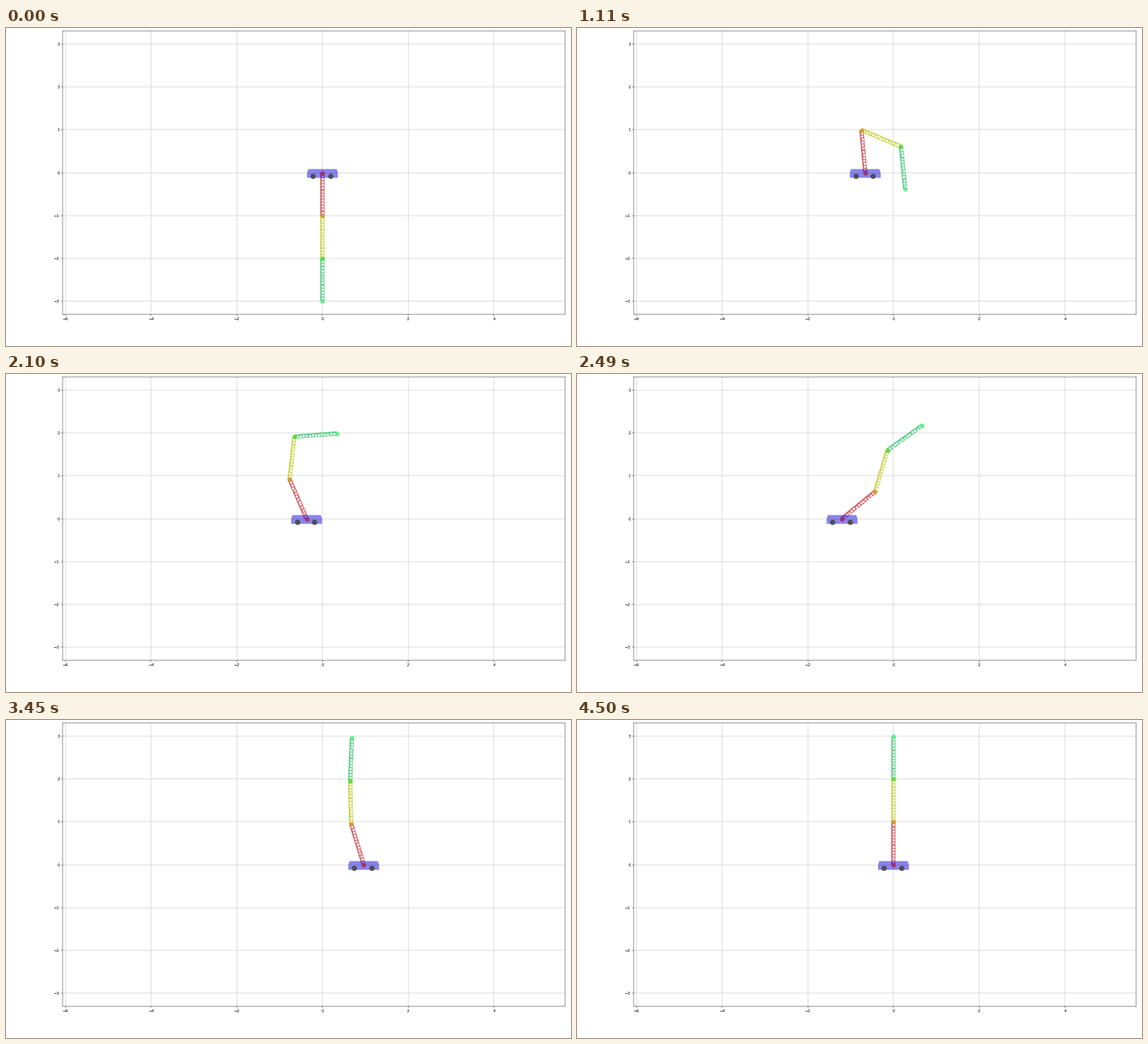
These frames come from a looping animation (768x432 px, 4.53 s). A matplotlib script:

```python
import numpy as np
import matplotlib.pyplot as plt
from matplotlib.animation import FuncAnimation
from matplotlib.patches import Polygon

FRAMES, STEP = 151, 30

# Key poses: seconds, cart position, three link angles from hanging (degrees)
POSES = np.array([
    (0, 0, 0, 0, 0),
    (.24, .45, -18, -6, -2),
    (.51, -.88, 78, 36.6, 5.4),
    (.66, -.98, 104, 46, 11),
    (1.08, -.69, 181, 64, 5),
    (1.71, .117, 232, 179, 54),
    (2.16, -.48, 195, 172, 100),
    (2.49, -1.2, 129.4, 163.4, 125.7),
    (2.67, -1.34, 125, 157, 141),
    (2.97, -.57, 161.4, 165.6, 160),
    (3.42, .96, 198, 181, 177),
    (3.9, -.25, 146.2, 177, 180),
    (4.2, -.14, 168, 176, 182.5),
    (4.5, 0, 180, 180, 180),
])

LINK_COLORS = ["#c83038", "#bcc81c", "#30c068"]
JOINT_COLORS = ["#a82860", "#d89a28", "#58dc38", "#58f088"]
BODY = np.array([(-.36, -.12), (-.36, 0), (-.33, .085),
                 (.33, .085), (.36, 0), (.36, -.12)])
WHEELS = np.array([-.22, .18])
HOLES = np.arange(1, 14) / 14


def glide(t, v, now):
    """Smooth curve through key values, at rest at both ends."""
    slope = np.gradient(v, t)
    slope[[0, -1]] = 0
    i = np.clip(np.searchsorted(t, now, side="right") - 1, 0, len(t) - 2)
    h = t[i + 1] - t[i]
    u = (now - t[i]) / h
    return ((1 + 2 * u) * (1 - u) ** 2 * v[i]
            + u * (1 - u) ** 2 * h * slope[i]
            + u ** 2 * (3 - 2 * u) * v[i + 1]
            + u ** 2 * (u - 1) * h * slope[i + 1])


now = np.arange(FRAMES) * STEP / 1000
cart, *angles = [glide(POSES[:, 0], v, now) for v in POSES.T[1:]]
angles = np.radians(angles)
joint_x = np.vstack([cart, cart + np.cumsum(np.sin(angles), axis=0)])
joint_y = np.vstack([0 * cart, -np.cumsum(np.cos(angles), axis=0)])

fig = plt.figure(figsize=(19.2, 10.8), dpi=40, facecolor="white")
ax = fig.add_axes([.1, .1, .89, .89])
ax.set_xlim(-6.067, 5.667)
ax.set_ylim(-3.3, 3.3)
ax.set_xticks(range(-6, 5, 2))
ax.set_yticks(range(-3, 4))
ax.set_axisbelow(True)
ax.grid(True)

bars = [ax.plot([], [], color=c, lw=10.5, alpha=.7, zorder=2,
                solid_capstyle="butt")[0] for c in LINK_COLORS]
holes, = ax.plot([], [], "o", color="white", ms=5.4, mew=0, zorder=3)
body = ax.add_patch(Polygon(BODY, closed=True, facecolor="#150bd7",
                            edgecolor="none", alpha=.5, zorder=4))
wheels, = ax.plot([], [], "o", color="#484848", ms=13, mew=0, alpha=.9,
                  zorder=5)
joints = [ax.plot([], [], "o", color=c, ms=11, mew=0, alpha=.85,
                  zorder=6)[0] for c in JOINT_COLORS]


def between(p):
    """Hole positions along every link, for one coordinate."""
    return (p[:-1, None] + np.diff(p)[:, None] * HOLES).ravel()


def draw(n):
    x, y = joint_x[:, n], joint_y[:, n]
    body.set_xy(BODY + [x[0], 0])
    wheels.set_data(x[0] + WHEELS, [-.075, -.075])
    holes.set_data(between(x), between(y))
    for k, bar in enumerate(bars):
        bar.set_data(x[k:k + 2], y[k:k + 2])
    for k, joint in enumerate(joints):
        joint.set_data([x[k]], [y[k]])
    return [*bars, holes, body, wheels, *joints]


anim = FuncAnimation(fig, draw, frames=FRAMES, interval=STEP, repeat=True,
                     repeat_delay=0)
plt.show()
```
